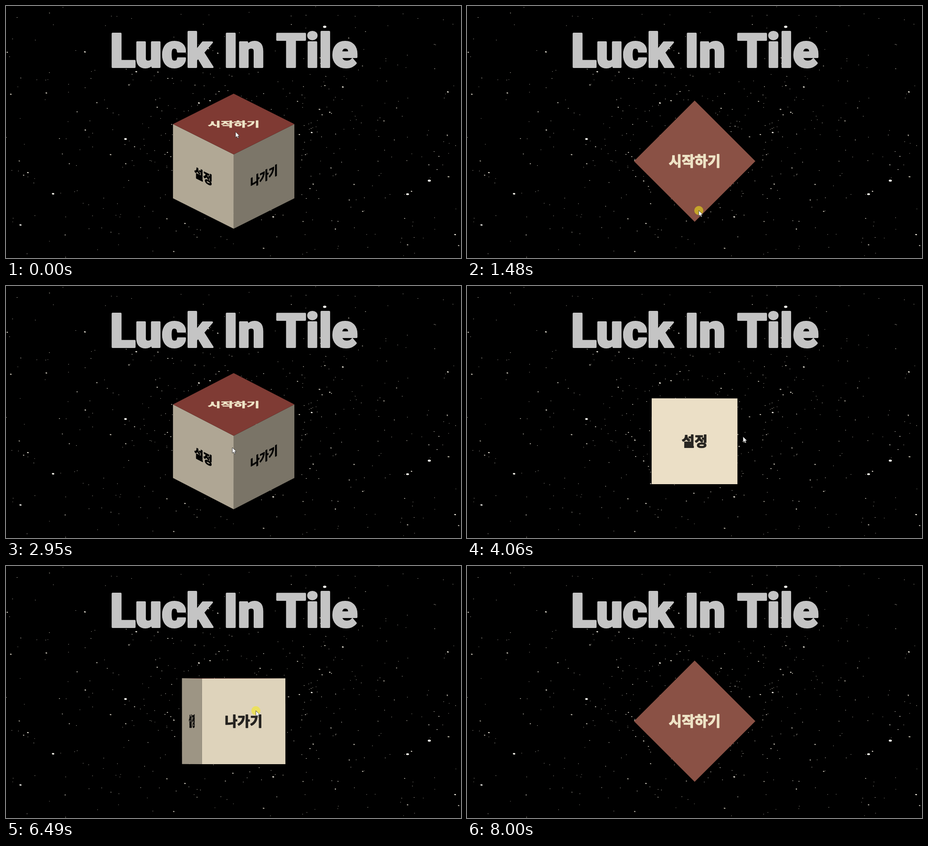
Recreate the animation shown at these times as an HTML page with a canvas. Size 1005 by 557 pixels, loop 8.07 s.

```html
<!DOCTYPE html>
<html lang="ko">
<head>
<meta charset="utf-8">
<style>
  html, body { margin: 0; width: 100%; height: 100%; overflow: hidden; background: #000; }
  canvas { display: block; }
</style>
</head>
<body>
<canvas id="stage" width="1005" height="557"></canvas>
<script>
const W = 1005, H = 557, LOOP = 8070;
const CX = 502.9, CY = 343, HALF = 94.8, SPEED = 0.008;
const ctx = document.getElementById('stage').getContext('2d');

function boldText(c, text, x, y, weight) {
  c.textAlign = 'center';
  c.lineJoin = 'round';
  c.lineWidth = weight;
  c.strokeStyle = c.fillStyle;
  c.fillText(text, x, y);
  c.strokeText(text, x, y);
}

// ---- background: stars and title, painted once ----
let seed = 20;
function random() {
  seed = (seed * 16807) % 2147483647;
  return seed / 2147483647;
}

function star(c, x, y, r, color) {
  c.fillStyle = color;
  c.beginPath();
  c.ellipse(x, y, r, r * 0.65, 0.1, 0, 7);
  c.fill();
}

function paintBackground() {
  const layer = document.createElement('canvas');
  layer.width = W;
  layer.height = H;
  const c = layer.getContext('2d');
  c.fillRect(0, 0, W, H);
  for (let i = 0; i < 560; i++) {
    // half of the stars are even, half gather right of the middle
    const even = i % 2 > 0;
    const x = even ? random() * W : 560 + (random() + random() - 1) * 440;
    const y = even ? random() * H : 290 + (random() + random() - 1) * 260;
    const v = 170 + random() * 85;
    star(c, x, y, 0.8 + 1.4 * random() ** 6, `rgb(${v},${v - 5},${v - 18})`);
  }
  const bright = [[704, 46], [935, 386], [887, 416], [264, 294], [104, 415], [32, 484]];
  bright.forEach(([x, y], i) => star(c, x, y, 3.7 - i * 0.25, '#fffdf4'));
  c.fillStyle = '#c4c4c4';
  c.font = '900 104px Roboto, Inter, sans-serif';
  boldText(c, 'Luck In Tile', 503, 134.5, 4);
  return layer;
}
const background = paintBackground();

// ---- cube orientation: quaternions easing towards the chosen pose ----
function pose(pitch, yaw) {
  const a = pitch * Math.PI / 360, b = yaw * Math.PI / 360;
  return [Math.cos(a) * Math.cos(b), Math.sin(a) * Math.cos(b),
          Math.cos(a) * Math.sin(b), Math.sin(a) * Math.sin(b)];
}
const HOME = pose(-30, -45), START = pose(-90, -45), SETTINGS = pose(0, 0), EXIT = pose(0, -90);

function slerp(p, q, k) {
  const dot = p.reduce((sum, v, i) => sum + v * q[i], 0);
  const angle = Math.acos(Math.min(1, Math.abs(dot)));
  if (angle < 1e-5) return q;
  const a = Math.sin((1 - k) * angle), b = Math.sin(k * angle) * Math.sign(dot);
  return p.map((v, i) => (v * a + q[i] * b) / Math.sin(angle));
}

// when the pointer picks a face or leaves the cube
const turns = [
  [15, START], [2450, HOME], [3340, SETTINGS], [4075, HOME], [4380, SETTINGS], [4680, HOME],
  [5240, EXIT], [5545, HOME], [5800, SETTINGS], [6255, EXIT], [6640, HOME], [7060, START]
];

function orientation(t) {
  let q = HOME;
  turns.forEach(([from, target], i) => {
    const to = Math.min(t, i + 1 < turns.length ? turns[i + 1][0] : LOOP);
    if (to > from) q = slerp(q, target, 1 - Math.exp(-SPEED * (to - from)));
  });
  return q;
}

function rotate([w, x, y, z], [a, b, c]) {
  return [
    a * (1 - 2 * (y * y + z * z)) + b * 2 * (x * y - w * z) + c * 2 * (x * z + w * y),
    a * 2 * (x * y + w * z) + b * (1 - 2 * (x * x + z * z)) + c * 2 * (y * z - w * x),
    a * 2 * (x * z - w * y) + b * 2 * (y * z + w * x) + c * (1 - 2 * (x * x + y * y))
  ];
}

// ---- faces: screen axes are x right, y down, z to the viewer ----
function beige([x, y, z]) {
  const v = (86 - 37.5 * x - 75 * y + 149 * z) / 235;
  return `rgb(${235 * v},${223 * v},${198 * v})`;
}
const red = ([, , z]) => `rgb(${116 + 22 * z},${35 + 46 * z},${33 + 36 * z})`;
const cream = () => '#eee3c6';
const ink = ([, , z]) => {
  const v = Math.max(0, z - 0.65) * 115;
  return `rgb(${v},${v * 0.95},${v * 0.85})`;
};

const faces = [
  { n: [0, 0, 1], u: [1, 0, 0], v: [0, 1, 0], label: '설정', turn: 0, fill: beige, text: ink },
  { n: [1, 0, 0], u: [0, 0, -1], v: [0, 1, 0], label: '나가기', turn: 0, fill: beige, text: ink },
  { n: [0, -1, 0], u: [1, 0, 0], v: [0, 0, 1], label: '시작하기', turn: -Math.PI / 4, fill: red, text: cream }
];

function drawCube(q) {
  for (const face of faces) {
    const n = rotate(q, face.n), u = rotate(q, face.u), v = rotate(q, face.v);
    if (n[2] < 0.002) continue;
    ctx.setTransform(u[0], u[1], v[0], v[1], CX + HALF * n[0], CY + HALF * n[1]);
    ctx.fillStyle = face.fill(n);
    ctx.fillRect(-HALF, -HALF, HALF * 2, HALF * 2);
    ctx.rotate(face.turn);
    ctx.font = '900 31px "Noto Sans CJK KR", "Noto Sans CJK", sans-serif';
    ctx.fillStyle = face.text(n);
    boldText(ctx, face.label, 0, 11.5, 1.6);
  }
  ctx.resetTransform();
}

// ---- pointer: time, x, y of its turning points ----
const path = [
  [0, 507, 278], [1480, 512, 452], [1900, 510, 430], [2600, 500, 132], [2950, 500, 357],
  [3600, 500, 360], [4060, 609, 333], [4200, 717, 325], [4730, 360, 360], [5240, 552, 374],
  [5660, 248, 350], [5800, 248, 350], [6490, 552, 320], [7000, 520, 240], [7600, 515, 420],
  [7930, 828, 498]
];
const HIDE = 7965;
const clicks = [1480, 6490];

function pointerAt(t) {
  const i = path.findIndex(p => p[0] > t);
  if (i < 0) return path[path.length - 1].slice(1);
  const [t0, x0, y0] = path[i - 1], [t1, x1, y1] = path[i];
  const k = (t - t0) / (t1 - t0);
  return [x0 + (x1 - x0) * k, y0 + (y1 - y0) * k];
}

const arrow = new Path2D('M0 0V12.5L2.9 9.9L5 14.2L7 13.3L5 9.1H8.8Z');

function drawPointer(t) {
  if (t > HIDE) return;
  const [x, y] = pointerAt(t);
  if (clicks.some(c => Math.abs(t - c) < 75)) {
    ctx.fillStyle = 'rgba(245,235,20,.55)';
    ctx.beginPath();
    ctx.arc(x, y, 10, 0, 7);
    ctx.fill();
  }
  ctx.translate(x, y);
  ctx.fillStyle = '#fff';
  ctx.strokeStyle = '#222';
  ctx.lineWidth = 0.8;
  ctx.fill(arrow);
  ctx.stroke(arrow);
  ctx.resetTransform();
}

function draw() {
  const t = performance.now() % LOOP;
  ctx.drawImage(background, 0, 0);
  drawCube(orientation(t));
  drawPointer(t);
  requestAnimationFrame(draw);
}
draw();
</script>
</body>
</html>
```
